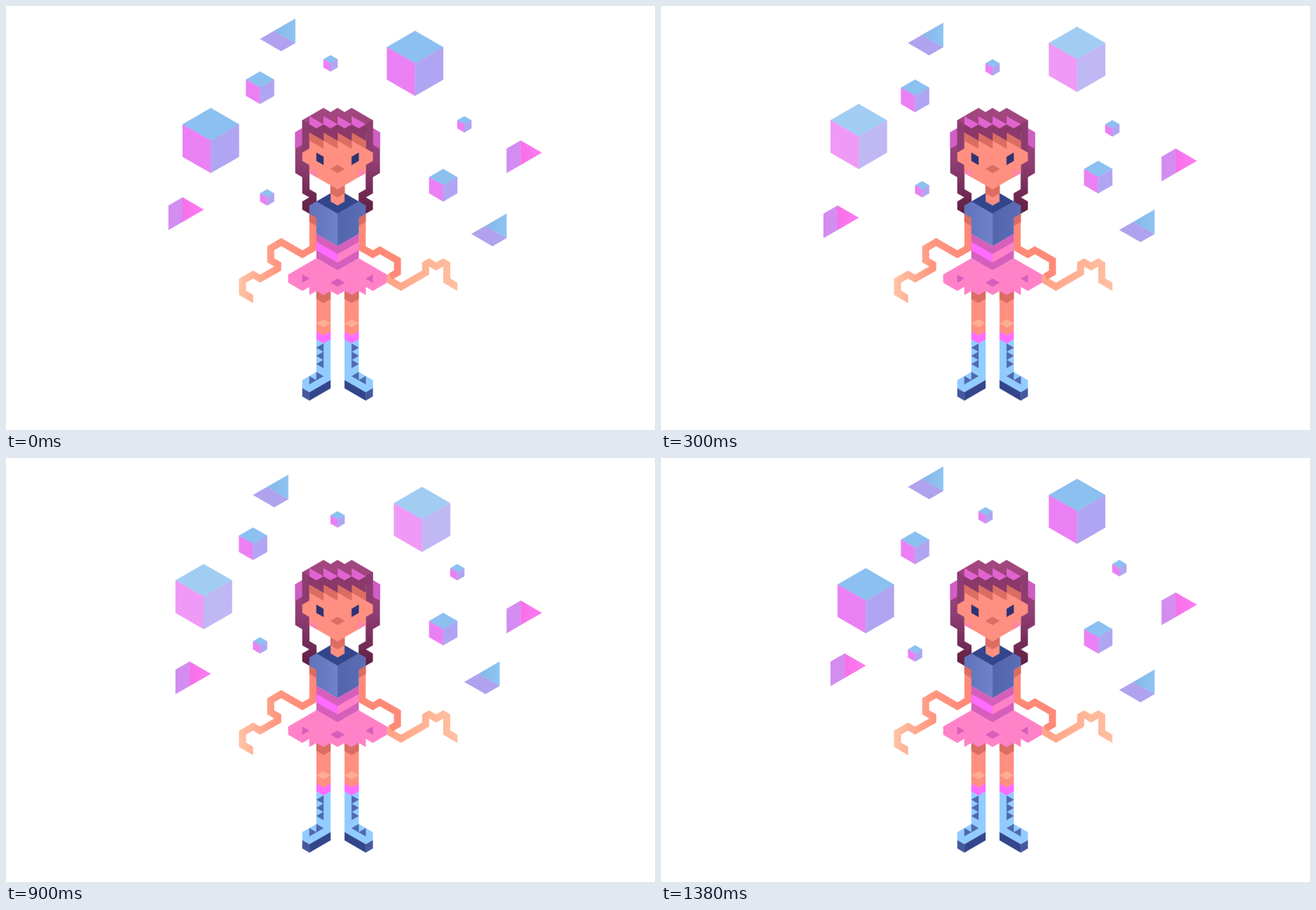
These frames come from a looping animation (926 by 605 pixels, 1.5 s). An HTML page with a canvas:

```html
<!DOCTYPE html>
<html lang="en">
<head>
<meta charset="utf-8">
<title>Isometric dancer</title>
<style>
html, body { margin: 0; width: 100%; height: 100%; overflow: hidden; background: #fff; }
canvas { display: block; }
</style>
</head>
<body>
<canvas id="stage" width="926" height="605"></canvas>
<script>
const ctx = document.getElementById('stage').getContext('2d');
const STEP = 300, STEPS = 5;
const COL = 10.05, ROW = 5.796;

// Isometric lattice: column 0 is the body axis, row 0 the top of the hair
const X = i => 473.1 + COL * i;
const Y = j => 145.6 + ROW * j;

// Everything is a walk along lattice edges, keyed like q w e / a s d
const DIRS = { q: [-1, -1], w: [0, -2], e: [1, -1], a: [-1, 1], s: [0, 2], d: [1, 1] };

// 'd3 s' means three edges down-right, then one down
function walk(i, j, route) {
  const points = [[i, j]];
  for (const move of route.split(' ')) {
    const [di, dj] = DIRS[move[0]], n = Number(move.slice(1)) || 1;
    points.push([i += di * n, j += dj * n]);
  }
  return points;
}

function trace(points, side = 1) {
  ctx.beginPath();
  for (const [i, j] of points) ctx.lineTo(X(i * side), Y(j));
}

function poly(color, i, j, route, side) {
  trace(walk(i, j, route), side);
  ctx.closePath();
  ctx.fillStyle = ctx.strokeStyle = color;
  ctx.lineWidth = 0.3;
  ctx.fill();
  ctx.stroke();
}

// Draws a shape and its mirror image across the body axis
function both(...shape) {
  poly(...shape);
  poly(...shape, -1);
}

// Strip one column wide along a walk
function ribbon(color, i, j, route) {
  trace(walk(i, j, route));
  ctx.strokeStyle = color;
  ctx.lineWidth = COL;
  ctx.stroke();
}

function fade(x0, y0, x1, y1, ...colors) {
  const g = ctx.createLinearGradient(x0, y0, x1, y1);
  colors.forEach((c, k) => g.addColorStop(k / (colors.length - 1), c));
  return g;
}

const SKIN = '#ff8f80', SHADE = '#db6d63', NAVY = '#33468c', LACE = '#4f69b0';
const PLUM = '#d65fbc', MAGENTA = '#ff6cff', PINK = '#ff82c8';

function arms() {
  const left = fade(443, 0, 333, 0, '#ff8878', '#ff9680', '#ffc2a4');
  const upper = fade(503, 0, 563, 0, '#ff8877', '#ff8a78');
  const lower = fade(543, 0, 644, 0, '#ffa386', '#ffc0a2');
  ribbon(left, -3.5, 26, 's4.25 a1.5 q3 a1.5 s1.5 d s0.5 a2.5 q a1.5 s1.5 d');
  poly(left, -13, 45, 'd s q');
  ribbon(lower, 7.5, 41, 's0.75 d1.5 e3.5 w e0.5 d e d0.5 s2 d');
  poly(lower, 16, 42, 'd s q');
  ribbon(upper, 3.5, 26, 's4.25 d1.5 e d2.5 s1.5 a');
  both(SHADE, -4, 26, 'd s q');
}

// Row of four slanted locks
function fringe(color, j, lock) {
  for (let i = -4; i < 4; i += 2) poly(color, i, j, lock);
}

function head(blink) {
  const hair = fade(0, 146, 0, 297, '#a4477f', '#913e75', '#5e1e40');
  poly(hair, -5, 3, 'e3 d e d e d3 s4 a5 q5');
  both(hair, -5, 5, 'a s5 d s2 d a s d e w2 q w8');
  both('#d05ec4', -5, 5, 'a s2 e');
  both('#8d3c70', -5, 3, 'd s3 a');

  poly(SKIN, -1, 19, 's2 d e w2');
  poly(SHADE, -1, 19, 'd e s a q');
  poly(SKIN, -4, 6, 's2 a s d s d4 e4 w e w q w2');
  fringe(SHADE, 6, 'd2 s q2');
  fringe('#8a3969', 4, 'd2 s q2');
  fringe('#8a3969', 2, 'd2 s q2');
  fringe('#e064d0', 2, 'd2 a q');

  both('#ff83ae', -4, 16, 'e s');
  poly(SHADE, 0, 14, 'd a q');
  if (!blink) return both('#2e3274', -3, 11, 'd s q');
  ctx.strokeStyle = '#2e3274';
  ctx.lineWidth = 1.8;
  for (const side of [-1, 1]) {
    trace(walk(-3, 11.15, 'd'), side);
    ctx.stroke();
  }
}

function legs() {
  both(SKIN, -3, 45, 's5 d e w5');
  both(SHADE, -3, 45, 's d e w');
  both('#ffad93', -2, 52, 'd a q');
  both(MAGENTA, -3, 55, 'd e s a q');
  both('#92ccff', -3, 57, 'd e s5 a3 q w e2');
  both(NAVY, -4, 70, 'e3 s a3');
  both('#45589f', -5, 69, 'd s q');
  for (let j = 58; j < 64; j += 2) both(LACE, -2, j, 's q');
  for (let i = -4; i < -2; i++) both(LACE, i, 62 - i, 'd a');
}

function clothes() {
  poly(fade(433, 0, 473, 0, '#6073bb', '#7082c9'), -4, 24, 'e d3 s4 q3 w2 q');
  poly(fade(513, 0, 473, 0, '#5b6eb5', '#5366ad'), -4, 24, 'e d3 s4 q3 w2 q', -1);
  poly(NAVY, -3, 23, 'e2 s d e w d2 a3');

  poly(PLUM, -3, 31, 'd3 e3 s3 a3 q3');
  poly(MAGENTA, -3, 33, 'd3 s q3');
  poly(PINK, 3, 33, 'a3 s e3');

  poly(PINK, -3, 37, 'd3 e3 d4 s a2 q s q a q a q a q a w a q2 w');
  poly(PLUM, 0, 42, 'd a q');
  both(PLUM, -5, 41, 'd a');
}

function cube(i, j, s, pale = 0) {
  poly('#8bc0f0', i, j, `d${s} a${s} q${s}`);
  poly('#eb80f4', i - s, j + s, `d${s} s${s} q${s}`);
  poly('#b0a5f2', i + s, j + s, `a${s} s${s} e${s}`);
  if (pale) poly(`rgba(255,255,255,${pale})`, i, j, `d${s} s${s} a${s} q${s} w${s}`);
}

// Big cubes grow pale towards the middle of the loop
const big = (i, j, n) => cube(i, j, 4, 0.2 * (2 - Math.abs(2 - n)));
const medium = (i, j) => cube(i, j, 2);
const small = (i, j) => cube(i, j, 1);

function blueShard(i, j) {
  poly('#b0a2ee', i - 5, j + 5, 'e2 d3 a2');
  poly(fade(X(i - 3), 0, X(i), 0, '#84b8e8', '#8ec3f2'), i, j, 's3 q3');
}

function pinkShard(i, j) {
  poly('#d38cf0', i, j, 's3 a2 w3');
  poly(fade(X(i), 0, X(i + 3), 0, '#f670e8', '#ff7cf2'), i, j, 'd3 a3');
}

// Shape, home column and row, and the hop before each new step
const drifters = [
  [big, -18, 0, 'q a d d'],
  [big, 11, -19, 'e d a w'],
  [medium, -11, -9, 's a w d'],
  [medium, 15, 15, 'w e a s'],
  [small, -1, -13, 'd e a q'],
  [small, 18, 2, 'a q e e'],
  [small, -10, 20, 'w q s s'],
  [blueShard, -6, -22, 'a s w w'],
  [blueShard, 24, 26, 'q w s s'],
  [pinkShard, -22, 22, 's sd w w'],
  [pinkShard, 26, 8, 's a e w']
];

function drift([shape, i, j, hops], n) {
  for (const key of hops.split(' ').slice(0, n).join('')) {
    i += DIRS[key][0];
    j += DIRS[key][1];
  }
  shape(i, j, n);
}

function draw(n) {
  ctx.fillStyle = '#fff';
  ctx.fillRect(0, 0, 926, 605);
  for (const d of drifters) drift(d, n);
  arms();
  head(n === 2);
  legs();
  clothes();
}

const start = performance.now();
let shown = -1;

function tick() {
  const n = Math.floor((performance.now() - start) / STEP) % STEPS;
  if (n !== shown) draw(shown = n);
  requestAnimationFrame(tick);
}
tick();
</script>
</body>
</html>
```
